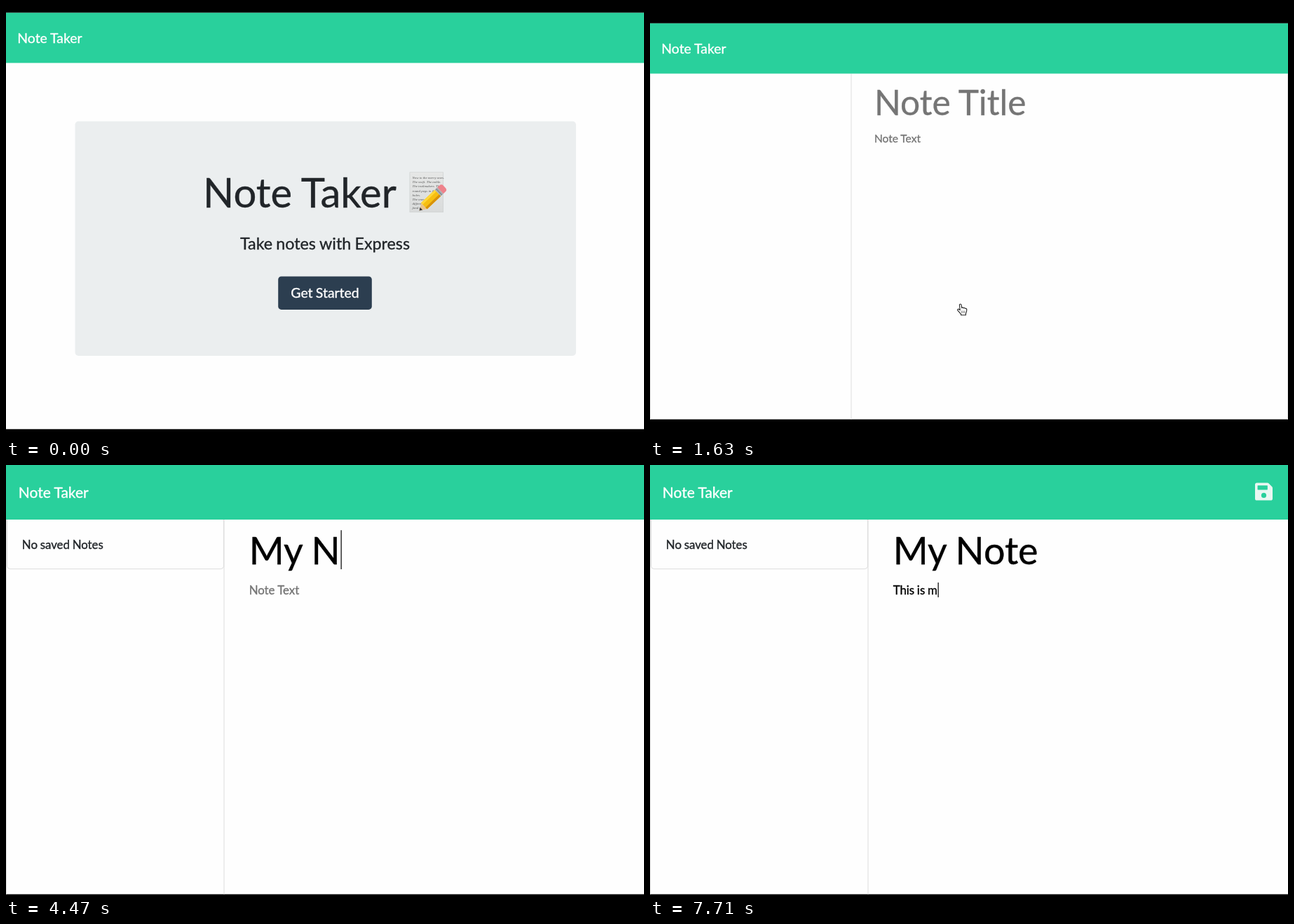
Animation, 910 px wide and 616 px high, one loop 8 s. Source, as an HTML page with a canvas:

```html
<!DOCTYPE html>
<html lang="en">
<head>
<meta charset="utf-8">
<title>Note Taker</title>
<style>
  html, body { margin: 0; width: 910px; height: 616px; overflow: hidden; background: #000; }
  canvas { display: block; }
</style>
</head>
<body>
<canvas id="stage" width="910" height="616"></canvas>
<script>
const ctx = document.getElementById('stage').getContext('2d');
const LOOP = 8000, ZOOM = 1.0836;
const GREEN = '#29d09c', PAPER = '#fefefe', INK = '#212529', HINT = '#757575', LINE = '#dedede';
const TITLE = { x: 319.9, y: 131, size: 49.7, top: 86, bottom: 137.5 };
const BODY = { x: 319.9, y: 170.7, size: 15.54, top: 155, bottom: 174.5 };

const ARROW = new Path2D('M0 0V13.2L3 10.4L5.2 15.2L7.6 14.1L5.4 9.5H9.5Z');
const HAND = new Path2D('M-1.6 1.2C-1.6-.5 .9-.5 1.1 1.2L1.7 5.4C2.4 4.5 3.8 4.6 4.2 5.7C5 5 6.3 5.2 6.7 6.3C7.8 5.9 8.8 6.6 8.8 7.9C8.8 11 8.2 12.2 7.4 13.6V15.6H.6V14.3C-1 12.6-2.6 10.6-4.2 8.8C-5 7.5-3.4 6.4-2.2 7.4L-.8 8.6Z');
const KNUCKLES = new Path2D('M1.7 9.5V13M3.8 9.5V13M5.9 9.5V13');
const BEAM = new Path2D('M-3.4-8Q-.4-8 0-6.3Q.4-8 3.4-8M0-6.3V6.3M-3.4 8Q-.4 8 0 6.3Q.4 8 3.4 8M-1.8 2H1.8');
const FLOPPY = new Path2D('M434 98L350 14A48 48 0 0 0 316 0H48A48 48 0 0 0 0 48V400A48 48 0 0 0 48 448H400A48 48 0 0 0 448 400V132A48 48 0 0 0 434 98Z');

const between = (t, a, b) => t >= a && t < b;
const lerp = (a, b, p) => a + (b - a) * p;
const easeInOut = p => p * p * (3 - 2 * p);

// Progress from 0 to 1 in n equal jumps.
function steps(t, start, end, n) {
  const p = Math.floor((t - start + 2) / (end - start) * n) / n;
  return Math.min(1, Math.max(0, p));
}

function typed(string, times, t) {
  return string.slice(0, times.filter(time => t >= time).length);
}

// A hairline stroke gives the slightly heavier look of smoothed screen text.
function text(string, x, y, size, color, align = 'left') {
  ctx.font = `${size}px Lato, sans-serif`;
  ctx.wordSpacing = `${-.036 * size}px`;
  ctx.textAlign = align;
  ctx.fillStyle = ctx.strokeStyle = color;
  ctx.lineWidth = .35;
  ctx.fillText(string, x, y);
  ctx.strokeText(string, x, y);
}

function rect(x, y, w, h, color) {
  ctx.fillStyle = color;
  ctx.fillRect(x, y, w, h);
}

function box(x, y, w, h, r, color) {
  ctx.beginPath();
  ctx.roundRect(x, y, w, h, r);
  ctx.fillStyle = color;
  ctx.fill();
}

function wedge(length, halfWidth, color) {
  ctx.beginPath();
  ctx.moveTo(0, 0);
  ctx.lineTo(length, -halfWidth);
  ctx.lineTo(length, halfWidth);
  ctx.fillStyle = color;
  ctx.fill();
}

function at(x, y, draw) {
  ctx.save();
  ctx.translate(x, y);
  draw();
  ctx.restore();
}

function outline(path, color, width) {
  ctx.strokeStyle = color;
  ctx.lineWidth = width;
  ctx.stroke(path);
}

function memoIcon() {
  const paper = ctx.createLinearGradient(0, 0, 0, 57);
  paper.addColorStop(0, '#e6e7e6');
  paper.addColorStop(1, '#d9dbdb');
  rect(0, 0, 48.5, 57.5, '#d0d3d3');
  rect(.8, .6, 46.9, 56, paper);
  ctx.font = 'italic 4.9px "Liberation Serif", serif';
  ctx.wordSpacing = '0px';
  ctx.textAlign = 'left';
  ctx.fillStyle = '#555';
  ['Now to the merry ones.', 'The swift. The noble.', 'The trailmakers. The', 'round pegs in the', 'holes.',
    'The ones who', 'differently all', 'fond of']
    .forEach((row, i) => ctx.fillText(row, 4, 9.5 + i * 6.2));
  at(14, 55, () => {
    ctx.rotate(-.76);
    wedge(10, 6.2, '#e8c48d');
    wedge(4, 2.5, '#3a3433');
    rect(9.5, -6.2, 27, 12.4, '#f6bf12');
    rect(9.5, -6.2, 27, 3.2, '#ffd738');
    rect(9.5, 2.8, 27, 3.4, '#d8920a');
    rect(36.5, -6.2, 5, 12.4, '#a9afb3');
    rect(38.3, -6.2, 1, 12.4, '#7a8287');
    box(41.5, -6.2, 8, 12.4, [0, 4, 4, 0], '#ee828b');
  });
}

function homePage(hovered, pressed) {
  box(98.5, 155.3, 714.5, 335.2, 5, '#ebeeef');
  text('Note Taker', 281, 279, 58, INK);
  at(575.5, 228, memoIcon);
  text('Take notes with Express', 455, 338.5, 23.3, INK, 'center');
  if (pressed) box(385.2, 374, 139.6, 53.6, 7, '#8c97a1');
  box(388.2, 377, 133.6, 47.5, 4.5, pressed ? '#1a252f' : hovered ? '#1e2b37' : '#2c3e50');
  text('Get Started', 455, 408, 19.43, '#fff', 'center');
}

function field({ x, y, size, top, bottom }, hint, value, caret) {
  text(value || hint, x, y, size, value ? '#000' : HINT);
  if (caret) rect(x + ctx.measureText(value).width + .7, top, 1.2, bottom - top, '#111');
}

function notesPage(t) {
  [0, 286.5, 909].forEach(x => rect(x, 72, 1, 500, LINE));
  if (t >= 1720) {
    ctx.beginPath();
    ctx.roundRect(1.5, 60, 285, 77, 4);
    ctx.strokeStyle = LINE;
    ctx.lineWidth = 1;
    ctx.stroke();
    text('No saved Notes', 21.1, 110.7, BODY.size, INK);
  }
  const title = typed('My Note', [3580, 3980, 4080, 4470, 4770, 4970, 5070], t);
  const body = typed('This is m', [6440, 6640, 6840, 6930, 7030, 7220, 7310, 7410, 7710], t);
  field(TITLE, 'Note Title', title, between(t, 2490, 3100) || between(t, 3490, 5560));
  field(BODY, 'Note Text', body, between(t, 5750, 6250) || t >= 6440);
}

function header(hasSave) {
  rect(0, 0, 910, 72, GREEN);
  text('Note Taker', 16.3, 43.2, 19.43, '#fff');
  if (hasSave) at(796.4, 23.6, () => {
    ctx.scale(.0515, .0515);
    ctx.fillStyle = '#e9f7f2';
    ctx.fill(FLOPPY);
    box(64, 64, 256, 112, 12, GREEN);
    box(160, 256, 128, 128, 64, GREEN);
  });
}

function pointer(t) {
  if (t < 110 || between(t, 4470, 5460) || t >= 7710) return null;
  if (t < 2020) {
    const p = easeInOut(steps(t, 110, 860, 8));
    const nudge = (t >= 1060) + 2 * (t >= 1250);
    const x = lerp(695.3, 440, p) + nudge, y = lerp(396, 401.5, p);
    return { x, y, kind: x < 522 ? 'hand' : 'arrow' };
  }
  if (t < 2490) {
    const p = steps(t, 1927, 2300, 4), q = 1 - p;
    return { x: q * q * 445 + 2 * p * q * 490 + p * p * 451, y: lerp(409, 93, easeInOut(p)), kind: 'beam' };
  }
  const p = easeInOut(steps(t, 5365, 5750, 4));
  return { x: lerp(451.3, 393.2, p), y: lerp(109, 158, p), kind: 'beam' };
}

function drawPointer({ x, y, kind }) {
  at(x, y, () => {
    ctx.lineJoin = 'round';
    if (kind === 'beam') {
      outline(BEAM, 'rgba(255,255,255,.8)', 2.2);
      outline(BEAM, '#555', 1);
    } else if (kind === 'arrow') {
      outline(ARROW, '#fff', 2);
      ctx.fillStyle = '#111';
      ctx.fill(ARROW);
    } else {
      ctx.fillStyle = '#fff';
      ctx.fill(HAND);
      outline(HAND, '#222', 1.1);
      outline(KNUCKLES, '#555', .8);
    }
  });
}

function draw(t) {
  const zoomed = t >= 3100, opening = t < 110;
  const cursor = pointer(t);
  rect(0, 0, 910, 616, '#000');
  ctx.save();
  ctx.lineJoin = 'round';
  if (zoomed) ctx.scale(ZOOM, ZOOM);
  else ctx.translate(0, opening ? 9.4 : 24.6);
  ctx.beginPath();
  ctx.rect(0, 0, 910, opening ? 595.4 : 566.2);
  ctx.clip();
  rect(0, 0, 910, 600, PAPER);
  if (t < 1630) homePage(cursor && cursor.kind === 'hand', t >= 1440);
  else notesPage(t);
  header(t >= 6440);
  if (cursor) drawPointer(cursor);
  ctx.restore();
}

function tick() {
  draw(performance.now() % LOOP);
  requestAnimationFrame(tick);
}
tick();
</script>
</body>
</html>
```
